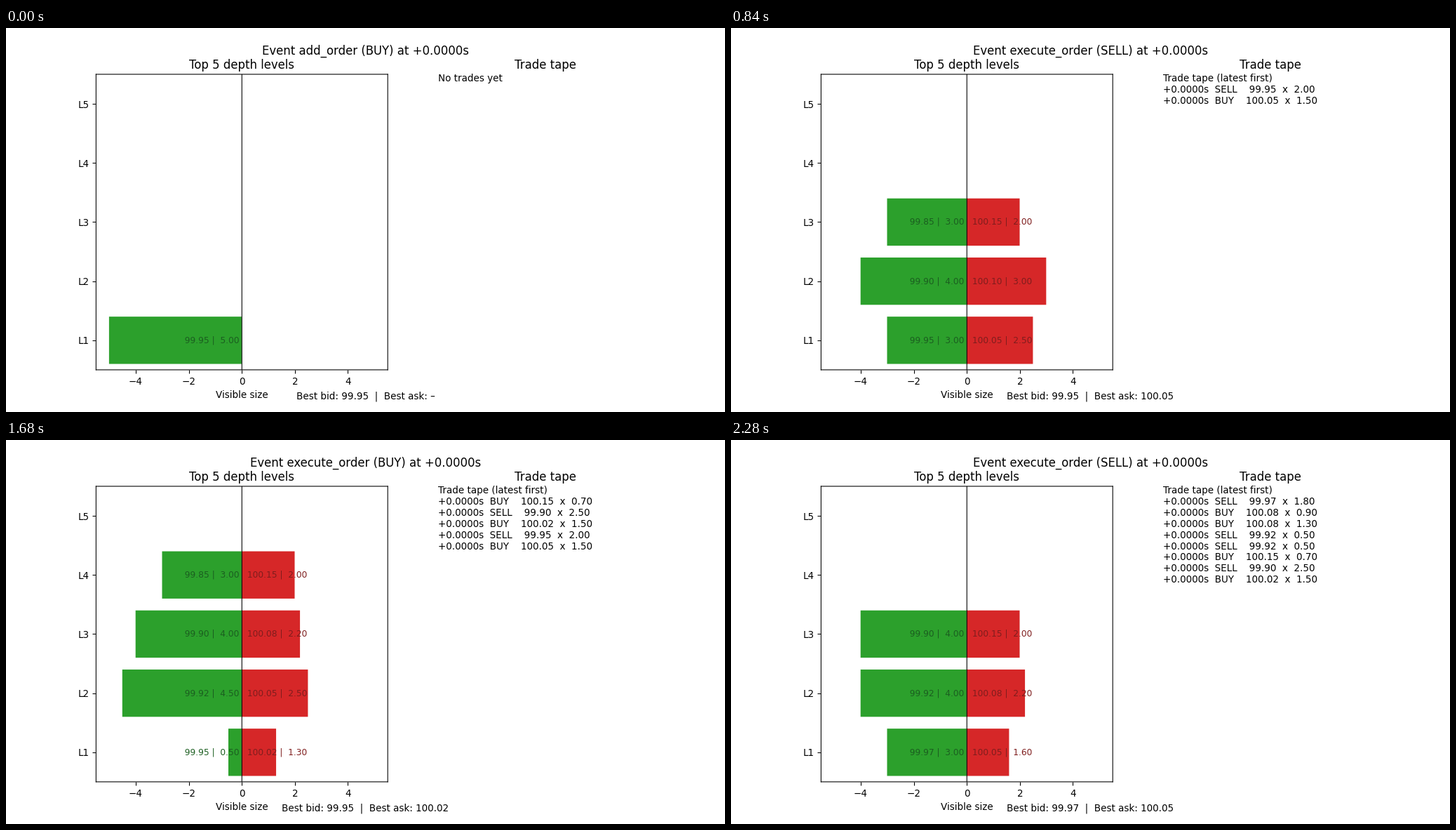
Animation of 1025x547 px, one loop 2400 ms. Source, as a matplotlib script:

```python
import matplotlib.pyplot as plt
from matplotlib.animation import FuncAnimation

W, H, DPI = 1025, 547, 100
STEP_MS = 120
LEVELS = 5
TAPE_ROWS = 8
FONT, TITLE = 9.76, 11.9
LINE = 0.78
BASE = -0.01  # bars start a fraction of a pixel left of the axis line

plt.rcParams.update({
    "font.family": "DejaVu Sans",
    "font.size": FONT,
    "axes.titlesize": TITLE,
    "axes.linewidth": LINE,
    "xtick.major.width": LINE,
    "ytick.major.width": LINE,
    "path.snap": False,
})

EVENTS = [
    ("add", "BUY", 99.95, 5.0),
    ("add", "BUY", 99.90, 4.0),
    ("add", "BUY", 99.85, 3.0),
    ("add", "SELL", 100.05, 4.0),
    ("add", "SELL", 100.10, 3.0),
    ("add", "SELL", 100.15, 2.0),
    ("execute", "BUY", 100.05, 1.5),
    ("execute", "SELL", 99.95, 2.0),
    ("add", "BUY", 99.92, 4.5),
    ("add", "SELL", 100.02, 3.5),
    ("cancel", "SELL", 100.10, 3.0),
    ("execute", "BUY", 100.02, 1.5),
    ("execute", "SELL", 99.90, 2.5),
    ("add", "SELL", 100.08, 2.2),
    ("execute", "BUY", 100.15, 0.7),
    ("execute", "SELL", 99.92, 1.0),
    ("cancel", "BUY", 99.85, 3.0),
    ("add", "BUY", 99.97, 4.8),
    ("execute", "BUY", 100.08, 2.2),
    ("execute", "SELL", 99.97, 1.8),
]


def ladder(book, side):
    """Levels of one side, best price first."""
    return sorted(book[side].items(), reverse=side == "BUY")


def match(book, side, price, size):
    """Fill against the other side; return the trades."""
    other = "SELL" if side == "BUY" else "BUY"
    trades = []
    for level, resting in ladder(book, other):
        if size <= 1e-9:
            break
        fill = min(size, resting)
        size -= fill
        if resting - fill > 1e-9:
            book[other][level] = resting - fill
        else:
            del book[other][level]
        trades.append((side, price, fill))
    return trades


def replay(events):
    book, tape, states = {"BUY": {}, "SELL": {}}, [], []
    for action, side, price, size in events:
        if action == "add":
            book[side][price] = size
        elif action == "cancel":
            del book[side][price]
        else:
            tape += match(book, side, price, size)
        states.append({
            "title": f"Event {action}_order ({side}) at +0.0000s",
            "BUY": ladder(book, "BUY"),
            "SELL": ladder(book, "SELL"),
            "tape": tape[::-1][:TAPE_ROWS],
        })
    return states


STATES = replay(EVENTS)

fig = plt.figure(figsize=(W / DPI, H / DPI), dpi=DPI)


def add_panel(left, right, top=65.93, bottom=486.93):
    """Axes from edges in pixels, y measured from the top."""
    return fig.add_axes([left / W, 1 - bottom / H,
                         (right - left) / W, (bottom - top) / H])


ax = add_panel(128.37, 544.2)
tape_ax = add_panel(616, 922.5)

ax.set_title("Top 5 depth levels")
ax.set_xlabel("Visible size")
ax.set_xticks(range(-4, 5, 2))
ax.set_yticks(range(1, LEVELS + 1), [f"L{k}" for k in range(1, LEVELS + 1)])
ax.axvline(0, color="black", lw=LINE)
tape_ax.set_title("Trade tape")
tape_ax.axis("off")

head = fig.text(0.5, 0.94, "", ha="center", va="center", fontsize=TITLE)
foot = fig.text(0.5, 0.04, "", ha="center", va="center")
rows = [fig.text(616 / W, 1 - (76.4 + 15.83 * k) / H, "", va="baseline")
        for k in range(TAPE_ROWS + 1)]


def make_side(sign, fill, ink, align):
    ys = range(1, LEVELS + 1)
    bars = ax.barh(ys, [0] * LEVELS, left=BASE, height=0.8, color=fill)
    tags = [ax.text(BASE + sign * 0.1, y, "", ha=align, va="center",
                    color=ink, fontsize=0.9 * FONT) for y in ys]
    return sign, bars, tags


sides = {
    "BUY": make_side(-1, "tab:green", "#1b5e20", "right"),
    "SELL": make_side(1, "tab:red", "#7f1d1d", "left"),
}
ax.set_xlim(-5.5, 5.5)
ax.set_ylim(0.5, LEVELS + 0.5)


def best(levels):
    return f"{levels[0][0]:.2f}" if levels else "–"


def tape_lines(trades):
    if not trades:
        return ["No trades yet"]
    return ["Trade tape (latest first)"] + [
        f"+0.0000s  {side:<4}  {price:>7.2f}  x  {size:.2f}"
        for side, price, size in trades]


def draw(i):
    state = STATES[i]
    head.set_text(state["title"])
    foot.set_text(f"Best bid: {best(state['BUY'])}  |  "
                  f"Best ask: {best(state['SELL'])}")
    for name, (sign, bars, tags) in sides.items():
        levels = state[name]
        for k, (bar, tag) in enumerate(zip(bars, tags)):
            shown = k < len(levels)
            bar.set_visible(shown)
            tag.set_visible(shown)
            if shown:
                price, size = levels[k]
                bar.set_width(sign * size)
                tag.set_text(f"{price:>7.2f} | {size:>5.2f}")
    lines = tape_lines(state["tape"])
    for k, row in enumerate(rows):
        row.set_text(lines[k] if k < len(lines) else "")
    return []


anim = FuncAnimation(fig, draw, frames=len(STATES), init_func=lambda: draw(0),
                     interval=STEP_MS, repeat=True, repeat_delay=0, blit=False)
plt.show()
```
